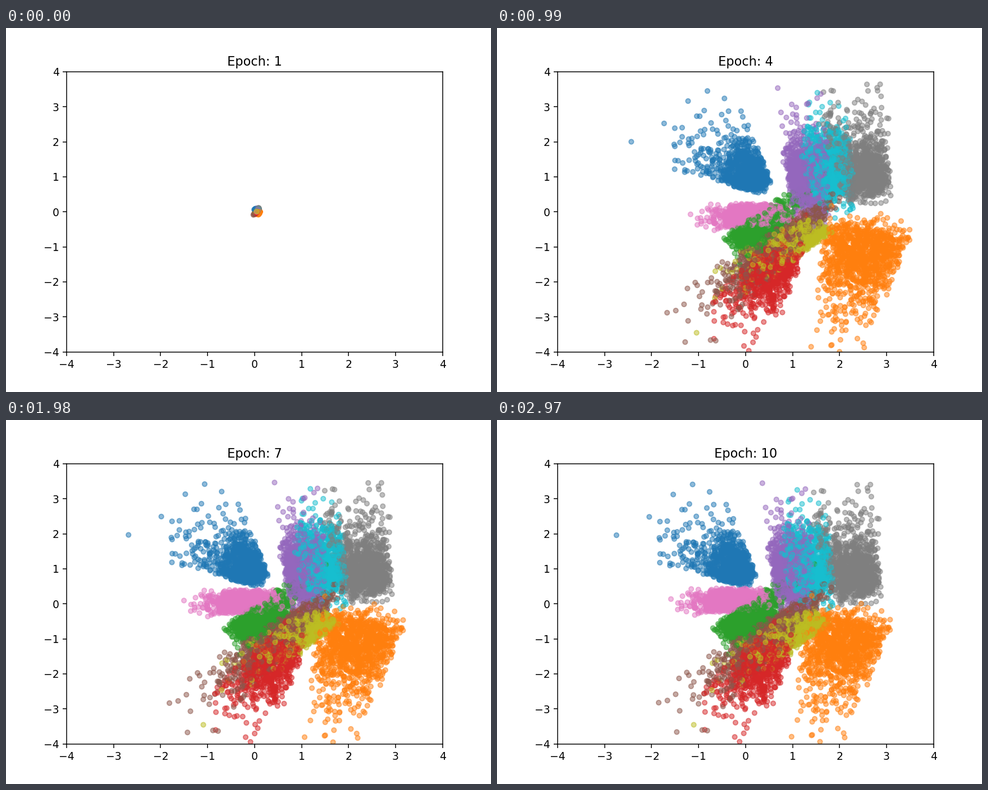
These frames come from a looping animation (864x648 px, 3.3 s). A matplotlib script:

```python
import numpy as np
import matplotlib.pyplot as plt
from matplotlib.animation import FuncAnimation

EPOCHS = 10
INTERVAL = 330
HOME = np.array([0.02, 0.02])

rng = np.random.default_rng(7)
clusters = []


def cluster(color, count, early, late, tilt, length, width, tail, taper):
    """A cloud whose centre drifts from early to late.

    It stretches along tilt (degrees); tail skews it that way and taper
    widens it that way.
    """
    along = np.expm1(tail * rng.standard_normal(count)) / tail
    across = 1.8 * np.tanh(rng.standard_normal(count) / 1.8)
    across *= np.maximum(0.15, 1 + taper * along)
    cos, sin = np.cos(np.radians(tilt)), np.sin(np.radians(tilt))
    cloud = np.outer(length * along, [cos, sin]) + np.outer(width * across, [-sin, cos])
    clusters.append((color, cloud, np.array(early), np.array(late)))


cluster("tab:blue", 980, (0.15, 1.15), (-0.38, 1.08), 132, 0.44, 0.32, 0.5, 0.42)
cluster("tab:orange", 1135, (2.7, -1.3), (2.0, -1.2), -100, 0.62, 0.52, 0.35, -0.06)
cluster("tab:green", 1030, (0.4, -0.6), (0.0, -0.5), 230, 0.42, 0.24, -0.3, 0.1)
cluster("tab:red", 1010, (0.65, -1.65), (0.32, -1.6), 245, 0.7, 0.34, 0.15, 0.25)
cluster("tab:purple", 980, (1.5, 1.1), (0.95, 0.95), 95, 0.55, 0.27, 0.15, 0.05)
cluster("tab:brown", 890, (0.9, -0.9), (0.6, -0.8), 228, 0.85, 0.24, 0.25, 0.3)
cluster("tab:pink", 960, (0.4, -0.25), (-0.3, 0.1), 184, 0.38, 0.2, 0.1, 0.05)
cluster("tab:gray", 1030, (2.6, 1.35), (2.25, 0.95), 98, 0.56, 0.35, 0.38, 0.12)
cluster("tab:olive", 970, (1.15, -0.75), (1.05, -0.75), 222, 0.45, 0.25, 0.45, 0.1)
cluster("tab:cyan", 1010, (2.0, 1.3), (1.28, 1.05), 95, 0.55, 0.31, 0.15, 0.02)

colors = np.concatenate([[color] * len(cloud) for color, cloud, *_ in clusters])
order = rng.permutation(len(colors))


def layout(epoch):
    drift = 1 - np.exp(-0.45 * (epoch - 3))
    growth = max(0.02, np.tanh(1.5 * (epoch - 1)))
    points = np.vstack([early + drift * (late - early) + cloud
                        for _, cloud, early, late in clusters])
    return HOME + growth * points[order]


fig, ax = plt.subplots(figsize=(6.4, 4.8), dpi=135)
ax.set(xlim=(-4, 4), ylim=(-4, 4))
dots = ax.scatter(*layout(1).T, s=20, c=colors[order], alpha=0.5)
title = ax.set_title("Epoch: 1")


def draw(i):
    dots.set_offsets(layout(i + 1))
    title.set_text(f"Epoch: {i + 1}")
    return dots, title


anim = FuncAnimation(fig, draw, frames=EPOCHS, interval=INTERVAL, repeat=True)
plt.show()
```
